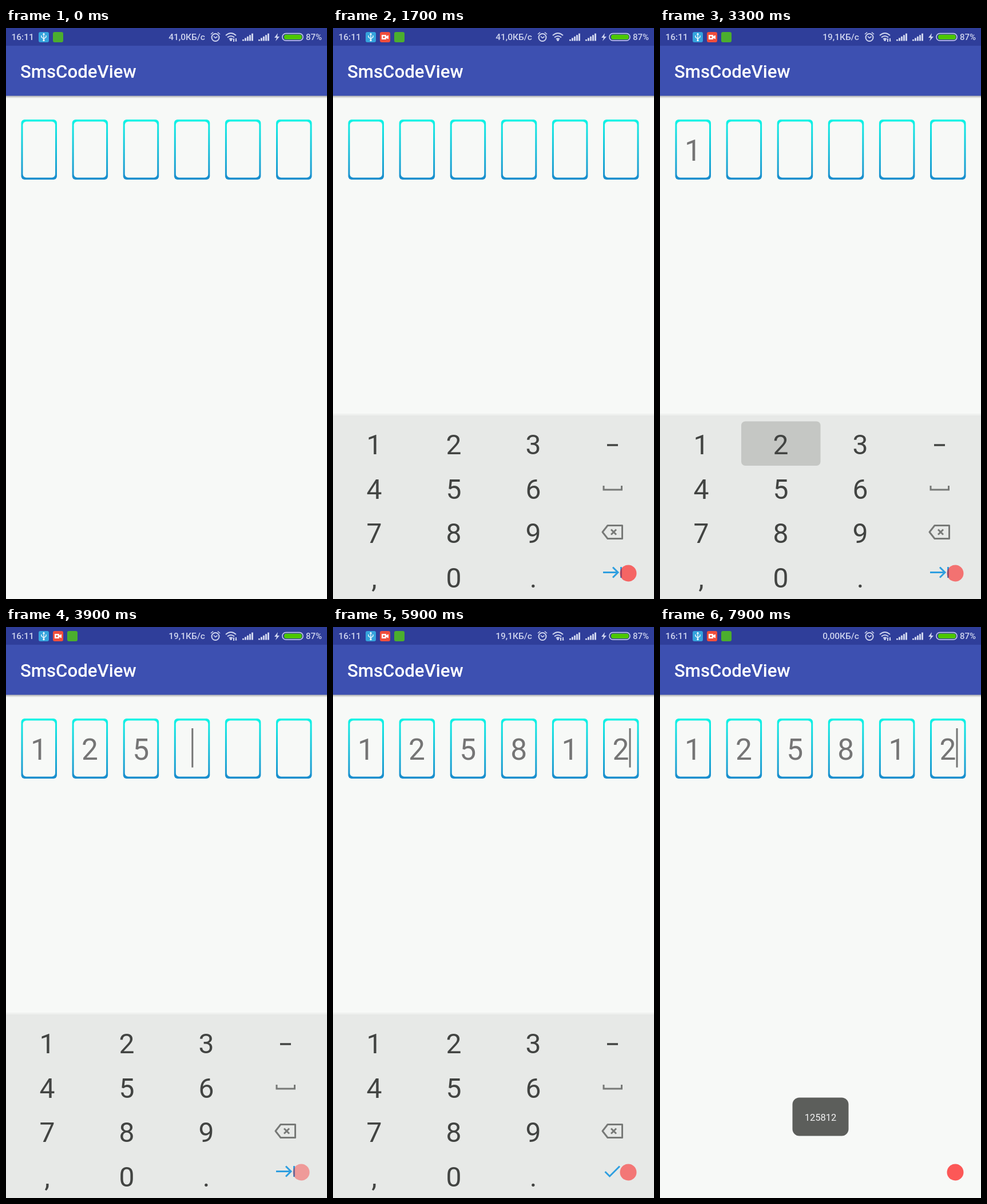
Write an HTML page that moves like this. It is 561 px wide and 998 px high and loops after 8000 ms.

```html
<!DOCTYPE html>
<html lang="en">
<head>
<meta charset="utf-8">
<title>SmsCodeView</title>
<style>
  html, body { margin: 0; width: 100%; height: 100%; overflow: hidden; background: #f7f9f7; }
  svg { display: block; width: 100%; height: 100%; font-family: Roboto, sans-serif; }
  .status { font-size: 15.5px; font-weight: 500; fill: #ced4ee; }
  .line { fill: none; stroke: #ced4ee; stroke-width: 2; }
  .keys { font-size: 48px; text-anchor: middle; fill: #424442; }
  .digit { font-size: 51.5px; text-anchor: middle; fill: #757575; }
  .key { fill: none; stroke: #777977; stroke-width: 3; }
  .next { fill: none; stroke: #2f9fe0; stroke-width: 3; }
</style>
</head>
<body>
<svg viewBox="0 0 561 998">
  <defs>
    <linearGradient id="edge" x2="0" y2="1">
      <stop stop-color="#0ff5e6"/><stop offset="1" stop-color="#1b8ccd"/>
    </linearGradient>
    <linearGradient id="shade" x2="0" y2="1">
      <stop stop-color="#000" stop-opacity=".32"/><stop offset="1" stop-color="#000" stop-opacity="0"/>
    </linearGradient>
  </defs>
  <rect width="561" height="998" fill="#f7f9f7"/>
  <rect y="118" width="561" height="5" fill="url(#shade)"/>
  <rect width="561" height="118.5" fill="#3d50b1"/>
  <rect width="561" height="31" fill="#2f3e9a"/>
  <text x="25" y="87" font-size="31.2" font-weight="500" fill="#fff">SmsCodeView</text>

  <g class="status">
    <text x="9.5" y="21">16:11</text>
    <text id="speed" x="348" y="21" text-anchor="end"></text>
    <text x="524" y="21" font-size="15">87%</text>
    <g id="bars"></g>
    <path d="M475 9l-6 8h4l-2 6 7-8h-4z"/>
    <circle cx="393" cy="21" r="2"/>
    <path id="traffic" d="M398 18l2 2h-1v4h-2v-4h-1zM402 24l-2-2h1v-4h2v4h1z"/>
  </g>
  <rect x="57" y="7" width="18" height="18" rx="3" fill="#35a3dc"/>
  <g fill="none" stroke="#fff" stroke-width="1.3">
    <path d="M66 10v12M62 13v3l4 3 4-3v-3"/>
    <circle cx="66" cy="21.5" r="1"/><path d="M64.5 11.5l1.5-2 1.5 2"/>
  </g>
  <g id="camera">
    <rect x="82" y="7" width="18" height="18" rx="3" fill="#f04e3c"/>
    <path d="M85 12h8v2.500l4-2v7l-4-2v2.500h-8z" fill="#fff"/>
    <circle cx="89" cy="16" r="1.800" fill="#f04e3c"/>
  </g>
  <rect id="app" y="7" width="18" height="18" rx="3" fill="#4bae2e"/>
  <g class="line">
    <circle cx="366" cy="16.500" r="6.500"/>
    <path d="M358 11l4-3.500M374 11l-4-3.500M363 14.500l3 3 3.500-2.500" stroke-width="1.600"/>
    <path d="M384 13q9-8 18 0M387 16.500q6-5 12 0M390 19.500q3-2.500 6 0"/>
    <rect x="483" y="9.500" width="36" height="12.500" rx="6" stroke-width="1.500"/>
  </g>
  <rect x="486" y="11.500" width="31" height="8.500" rx="3.500" fill="#4cc800"/>

  <g id="boxes"></g>
  <rect id="caret" y="177" width="3" height="68.500" fill="#757575"/>

  <g id="keyboard">
    <rect y="674" width="561" height="3" fill="#eff1ef"/>
    <rect y="677" width="561" height="321" fill="#e7e9e7"/>
    <rect id="press" width="138.500" height="77.500" rx="7" fill="#c5c7c4"/>
    <g id="keys" class="keys"></g>
    <path d="M479 729h19" class="key" style="stroke:#424442;stroke-width:3.500"/>
    <path d="M473 800v7h31.500v-7" class="key"/>
    <path d="M480 869.500h25.500v23h-25.500l-9-11.500zM486 876.500l9 9m0-9l-9 9" class="key" stroke-linejoin="round"/>
    <path id="tab" d="M472 951.500h26m-9-9l9 9-9 9M503.500 942v19" class="next"/>
    <path id="done" d="M475.500 952l8 8 17.500-17.500" class="next"/>
  </g>

  <g id="toast">
    <rect x="231.500" y="822.500" width="98" height="67" rx="12" fill="#5c5e5b"/>
    <text x="280.500" y="863" font-size="16.500" text-anchor="middle" fill="#f4f4f4">125812</text>
  </g>
  <circle id="dot" cx="516" cy="953" r="14.500" fill="#f00"/>
</svg>
<script>
const LOOP = 8000, PITCH = 89.1;
const CODE = '125812', TYPED = [2700, 3400, 3850, 4350, 4950, 5450];
// key column, key row, press start, press end
const PRESSES = [[0, 0, 2550, 2700], [1, 0, 3200, 3400], [1, 1, 3700, 3850],
                 [1, 2, 4200, 4350], [1, 0, 5300, 5450]];
const $ = id => document.getElementById(id);
const set = (id, attrs) => { for (const k in attrs) $(id).setAttribute(k, attrs[k]); };
const show = (id, on) => { $(id).style.display = on ? '' : 'none'; };
const ramp = (t, from, to) => Math.min(1, Math.max(0, (t - from) / (to - from)));
const boxX = i => 26.5 + i * PITCH;

$('boxes').innerHTML = [...CODE].map((c, i) => `
  <rect x="${boxX(i)}" y="160" width="62.500" height="105" rx="6" fill="url(#edge)"/>
  <rect x="${boxX(i) + 3}" y="163.500" width="56.500" height="98" rx="6" fill="#f7f9f7"/>
  <text id="digit${i}" class="digit" x="${boxX(i) + 31}" y="232">${c}</text>`).join('');

$('keys').innerHTML = [...'123456789,0.'].map((c, i) =>
  `<text x="${72 + i % 3 * 139}" y="${745 + Math.floor(i / 3) * 77.5}">${c}</text>`).join('');

$('bars').innerHTML = [413, 441].map(x => [0, 1, 2, 3, 4].map(i => {
  const h = 2.5 + i * 2.6;
  return `<rect x="${x + i * 4}" y="${22.5 - h}" width="3" height="${h}"/>`;
}).join('')).join('');

function draw(t) {
  const recording = t >= 300;
  show('camera', recording);
  set('app', { x: recording ? 107 : 82 });
  show('traffic', t < 900 || t >= 2000);
  $('speed').textContent = (t < 2800 ? '41,0' : t < 6800 ? '19,1' : '0,00') + 'КБ/с';

  const count = TYPED.filter(at => t >= at).length;
  TYPED.forEach((at, i) => show('digit' + i, t >= at));
  const since = t - (count ? TYPED[count - 1] : 900);
  show('caret', since >= 0 && since % 1000 < 500);
  set('caret', { x: count < 6 ? boxX(count) + 30.5 : boxX(5) + 45.5 });

  const up = ramp(t, 1450, 1700) * (1 - ramp(t, 7400, 7600));
  show('keyboard', up > 0);
  set('keyboard', { transform: `translate(0 ${324 * (1 - up) ** 2})` });
  const press = PRESSES.find(p => t >= p[2] && t < p[3]);
  show('press', press);
  if (press) set('press', { x: 142 + (press[0] - 1) * 139, y: 687.5 + press[1] * 77.5 });
  show('tab', count < 5);
  show('done', count >= 5);

  set('toast', { opacity: ramp(t, 7500, 7750) });
  const phase = (t / 1040 + .08) % 1;
  set('dot', { opacity: t < 400 ? 0 : 1 - Math.abs(2 * phase - 1) });
}

const start = performance.now();
function tick() {
  draw((performance.now() - start) % LOOP);
  requestAnimationFrame(tick);
}
tick();
</script>
</body>
</html>
```
